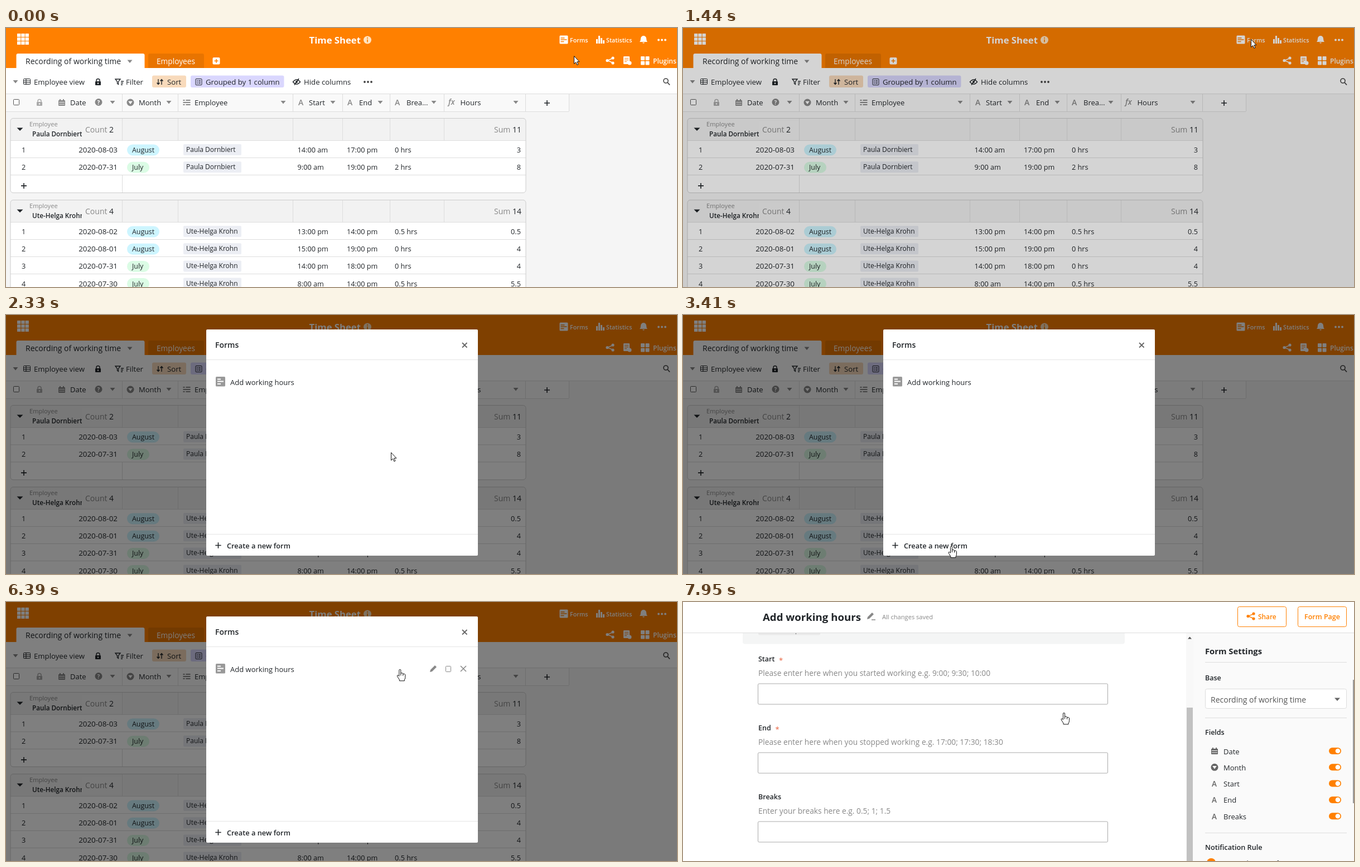
An HTML page that plays this animation: 1203 px wide and 466 px high, repeating every 8 s.

```html
<!DOCTYPE html>
<html lang="en">
<head>
<meta charset="utf-8">
<title>Time Sheet</title>
<style>
html, body { margin: 0; width: 100%; height: 100%; overflow: hidden; background: #fff; }
svg { display: block; width: 1203px; height: 466px; font-family: "Open Sans", "Noto Sans", sans-serif; }
</style>
</head>
<body>
<svg id="stage" viewBox="0 0 1203 466"></svg>
<script>
const ORANGE = '#ff8000', INK = '#212529', GRAY = '#888', LINE = '#ddd';
const stage = document.getElementById('stage');

// Drawing helpers, each returns SVG markup
const text = (x, y, s, size = 13, fill = INK, weight = 400, anchor = 'start') =>
  `<text x="${x}" y="${y}" font-size="${size}" fill="${fill}" font-weight="${weight}" text-anchor="${anchor}">${s}</text>`;
const rect = (x, y, w, h, fill, r = 0, stroke = 'none') =>
  `<rect x="${x}" y="${y}" width="${w}" height="${h}" rx="${r}" fill="${fill}" stroke="${stroke}"/>`;
const fillPath = (d, fill = GRAY) => `<path d="${d}" fill="${fill}"/>`;
const stroke = (d, color = INK, w = 1.5) => `<path d="${d}" fill="none" stroke="${color}" stroke-width="${w}"/>`;
const dot = (x, y, r, fill) => `<circle cx="${x}" cy="${y}" r="${r}" fill="${fill}"/>`;
const hline = (x1, x2, y, color = LINE) => stroke(`M${x1} ${y + .5}H${x2}`, color, 1);
const vlines = (xs, y1, y2, color = LINE) => xs.map(x => stroke(`M${x + .5} ${y1}V${y2}`, color, 1)).join('');
const group = (id, body) => `<g id="${id}">${body}</g>`;

// Icons
const caret = (x, y, fill = GRAY, w = 4.5) => fillPath(`M${x - w} ${y - 2.5}h${2 * w}l${-w} 5.5z`, fill);
const plus = (x, y, r = 5, color = INK, w = 1.6) => stroke(`M${x - r} ${y}h${2 * r}M${x} ${y - r}v${2 * r}`, color, w);
const dots = (x, y, fill) => [-6, 0, 6].map(d => dot(x + d, y, 1.9, fill)).join('');
const letterA = (x, y) => text(x, y, 'A', 14, GRAY, 600);
const lock = (x, y, color) => rect(x - 5, y - 1, 10, 7, color, 1) + stroke(`M${x - 3} ${y}v-2.5a3 3 0 0 1 6 0v2.5`, color) + dot(x, y + 2.5, 1.2, '#fff');
const calendar = (x, y, color = GRAY) => rect(x - 6, y - 4, 12, 10, color, 1) +
  stroke(`M${x - 3} ${y - 6}v3m6 -3v3`, color, 2) + stroke(`M${x - 5} ${y - .5}h10m-10 3.5h10`, '#fff', 1);
const dropCircle = (x, y, color = GRAY) => dot(x, y, 6.5, color) + caret(x, y + .3, '#fff', 3.8);
const share = (x, y, color) => stroke(`M${x + 5} ${y - 4}L${x - 5} ${y}L${x + 5} ${y + 4}`, color) +
  dot(x + 5, y - 4.5, 2.6, color) + dot(x - 5, y, 2.6, color) + dot(x + 5, y + 4.5, 2.6, color);
const formIcon = (x, y, color, back) => rect(x, y, 15, 15, color, 1.5) +
  stroke(`M${x + 2} ${y + 4.5}h7M${x + 2} ${y + 7.5}h11M${x + 2} ${y + 11}h6`, back, 1.5);
const pencil = (x, y, color = GRAY) => fillPath(`M${x - 6} ${y + 6}l1 -4l8 -8l3 3l-8 8z`, color);
const listIcon = (x, y, color) => stroke(`M${x} ${y - 4}h3m2 0h8M${x} ${y}h13M${x} ${y + 4}h3m2 0h8`, color, 1.8);
const tab = (x1, x2, fill) => fillPath(`M${x1} 72V49q0 -3 3 -3H${x2 - 3}q3 0 3 3V72z`, fill);

function topBar() {
  let s = rect(0, 0, 1203, 72, ORANGE);
  for (let i = 0; i < 9; i++) s += rect(20 + i % 3 * 7.3, 10 + Math.floor(i / 3) * 7, 6.3, 6, '#fff', .5);
  s += text(543.5, 28, 'Time Sheet', 16.7, '#fff', 700) + dot(648, 21.5, 7, '#ffe3c0') + stroke('M648 17v2m0 1.5v5', ORANGE, 1.8);
  s += formIcon(992.5, 13.5, '#fff', ORANGE) + text(1011, 25.5, 'Forms', 10.8, '#fff', 600);
  s += stroke('M1059.5 28v-8m4 8v-14m4 14v-10m4 10v-6', '#fff', 3) + text(1076, 25.5, 'Statistics', 10.7, '#fff', 600);
  s += fillPath('M1136 25q2 -2 2 -6a5 5 0 0 1 10 0q0 4 2 6zM1141 26h4q-2 3 -4 0z', '#fff') + dots(1176, 21.5, '#fff');
  s += tab(18.5, 248.5, '#fff') + text(35, 65, 'Recording of working time', 14) + caret(222, 60);
  s += tab(255, 355, '#e87400') + text(270, 65, 'Employees', 13.7, '#fff');
  s += rect(370.5, 53, 13, 12.5, '#fff', 2) + plus(377, 59.2, 3.5, ORANGE);
  s += share(1083, 58.5, '#fff') + rect(1107, 51, 11, 14, '#fff', 1) + stroke('M1109 54.5h7m-7 3h7m-7 3h4', ORANGE, 1) + dot(1118, 63, 3.5, '#fff');
  s += [[1138, 51], [1138, 59.5], [1146.5, 59.5], [1146.5, 51]].map(([x, y]) => rect(x, y, 7, 7, '#fff', 1)).join('');
  return s + text(1160, 64, 'Plugins', 12, '#fff', 600);
}

function toolBar() {
  const label = (x, s) => text(x, 101.5, s, 13.2);
  let s = rect(0, 72, 1203, 46, '#fff') + caret(17, 96.5);
  s += rect(31.5, 91.5, 12, 10, 'none', 1, INK) + stroke('M32 95h11m-11 3.3h11M36 92v9', INK, 1.1) + label(50, 'Employee view') + lock(165, 97, INK);
  s += stroke('M196 92h9l-3.5 4.5v5l-2 -1.5v-3.5zM206 96h5m-5 3h4m-4 3h3', INK, 1.3) + label(215, 'Filter');
  s += rect(262, 85.5, 61, 21.5, '#f8dabb', 3) + stroke('M273 92v9m-2.5 -2.5l2.5 3l2.5 -3M279 102v-9m-2.5 2.5l2.5 -3l2.5 3', INK, 1.4) + label(289, 'Sort');
  s += rect(331, 85.5, 167.5, 21.5, '#dad7fe', 3) + rect(340, 91.5, 11, 11, 'none', 1, INK) + stroke('M342 94.5h2m1 0h4m-7 2.5h2m1 0h4m-7 2.5h2m1 0h4', INK, 1.2) + label(358, 'Grouped by 1 column');
  s += stroke('M514.5 97q6.5 -8 13 0q-6.5 8 -13 0zM517 102.5l8 -11.5') + dot(521, 97, 2, INK) + label(534, 'Hide columns');
  return s + dots(649, 97, '#444') + '<circle cx="1183" cy="95" r="4" fill="none" stroke="#444" stroke-width="1.6"/>' + stroke('M1186 98l4 4.5', '#444', 1.8);
}

function columnHeads() {
  const label = (x, s) => text(x, 138.5, s);
  let s = rect(0, 118, 1009, 32, '#f9f9f9') + hline(0, 1203, 118) + hline(0, 1009, 150);
  s += vlines([208, 308, 514, 603, 688, 785, 931, 1009], 118, 150);
  s += rect(13.5, 128.5, 10, 10, '#fff', 1, '#555') + lock(60, 134, '#aaa');
  s += calendar(100, 134) + label(115, 'Date') + dot(166, 133.5, 6.5, GRAY) + text(166, 137.5, '?', 10, '#fff', 700, 'middle');
  s += dropCircle(223, 134) + label(238, 'Month') + listIcon(317.5, 134, GRAY) + label(338, 'Employee');
  s += letterA(524, 139) + label(543, 'Start') + letterA(612, 139) + label(633, 'End') + letterA(697, 139) + label(718, 'Brea...');
  s += `<g font-style="italic">${text(793, 138, 'fx', 13.5, GRAY, 600)}</g>` + label(814.5, 'Hours') + plus(970, 135);
  return s + [191, 292, 497, 586, 671, 767, 914].map(x => caret(x, 133.5)).join('');
}

function employeeGroup(top, height, name, sum, rows) {
  const body = top + 40, cols = [308, 514, 603, 688, 785];
  let s = rect(8, top, 924, height, '#fff', 5) + fillPath(`M8 ${body}V${top + 5}q0 -5 5 -5H927q5 0 5 5V${body}z`, '#f2f2f2');
  s += caret(25, top + 20, INK, 5.5) + text(42, top + 15, 'Employee', 11.1, GRAY) + text(47, top + 32.5, name, 11.7, INK, 600);
  s += rect(136, top + 6, 72, 32, '#f3f3f3') + text(142, top + 26, `Count <tspan fill="${INK}">${rows.length}</tspan>`, 14, GRAY);
  s += text(924, top + 26, `Sum <tspan fill="${INK}">${sum}</tspan>`, 14, GRAY, 400, 'end');
  s += vlines([208, ...cols], top, body) + hline(8, 932, body);
  rows.forEach(([date, start, end, pause, hours], i) => {
    const y = body + 31.2 * i, base = y + 22, august = date[1] === '8';
    const cell = (x, value, anchor) => text(x, base, value, 12.7, INK, 400, anchor);
    s += cell(28, i + 1) + text(200, base, '2020-' + date, 13.4, INK, 400, 'end');
    s += rect(217, y + 7.5, august ? 58 : 40, 20, august ? '#cdf5ff' : '#dbfce5', 10) + text(226, base, august ? 'August' : 'July', 12.4);
    s += rect(318, y + 7, 104, 20, '#eceef4', 2) + text(323, base - 1, name, 12);
    s += cell(522.5, start) + cell(611, end) + cell(697, pause + ' hrs') + cell(923, hours, 'end') + hline(8, 932, Math.round(y + 31));
  });
  const last = body + 31.2 * rows.length;
  s += vlines([208], last, top + height) + plus(32, last + 19.5);
  return s + rect(8, top + .5, 924, height - 1, 'none', 5, '#ccc');
}

function modal() {
  let s = rect(359, 26, 487, 407, '#fff', 2) + text(375, 58.5, 'Forms', 14, INK, 600);
  s += stroke('M818 50l8.5 8.5m0 -8.5l-8.5 8.5', '#666', 1.8) + hline(359, 846, 80, '#e5e5e5') + hline(359, 846, 394, '#e5e5e5');
  s += plus(380.5, 414.5, 5.2) + text(396, 420, 'Create a new form', 12.8, INK, 600);
  s += group('spinner', '<circle cx="602.5" cy="106" r="8.5" fill="none" stroke="#ccc" stroke-width="1.5"/>' + stroke('M602.5 97.5a8.5 8.5 0 0 1 8.5 8.5', '#555', 1.7));
  s += group('item', rect(376, 111, 17, 17.5, '#999', 1.5) + stroke('M379 115.5h6m-6 4h11m-11 4.5h6', '#fff', 2) + text(402, 125.5, 'Add working hours'));
  const tools = pencil(766, 120) + rect(788.5, 115.5, 9, 10, 'none', 1, GRAY) + stroke('M815 115l10 10m0 -10l-10 10', GRAY);
  return s + group('tools', tools);
}

function question(y, label, hint, required) {
  return text(135, y, label, 12.5, INK, 600) + (required ? text(required, y + 3, '*', 13, '#e8603c') : '') +
    text(135, y + 26.5, hint, 13.75, GRAY) + rect(134.5, y + 40.5, 627, 37, '#fff', 2, '#aaa');
}

function formPage() {
  let fields = text(135, 97.5, 'Date', 12.5, INK, 600) + rect(134.5, 112.5, 312, 36, '#fff', 2, '#aaa');
  fields += group('monthHover', rect(107, 157, 685, 83, '#f4f5f5', 4)) + text(135, 188.5, 'Month', 12.5, INK, 600);
  fields += rect(135, 203, 111, 21, '#e9e9e9', 2) + text(146, 219, 'Add an option', 13.2, '#777');
  fields += question(271, 'Start', 'Please enter here when you started working e.g. 9:00; 9:30; 10:00', 172);
  fields += question(395, 'End', 'Please enter here when you stopped working e.g. 17:00; 17:30; 18:30', 165.5);
  fields += question(519, 'Breaks', 'Enter your breaks here e.g. 0.5; 1; 1.5');
  let s = group('fields', fields) + rect(902, 56, 13, 410, '#f8f8f8');
  s += group('thumb', rect(903, 71, 11, 376, '#c1c1c1')) + '<path id="scrollUp" d="M905 66.5h7l-3.5 -4z"/>';
  s += rect(915, 56, 288, 410, '#fafafa') + rect(1201, 140, 2, 222, '#999');
  s += rect(0, 0, 1203, 55, '#fff') + hline(0, 1203, 55) + text(143, 34, 'Add working hours', 18.65, INK, 700);
  s += pencil(336, 25) + stroke('M338 32h7', GRAY) + text(357, 30.5, 'All changes saved', 11.1, GRAY);
  s += rect(994.5, 8.5, 87, 36, '#fff', 3, ORANGE) + share(1018, 25.5, ORANGE) + text(1031, 30.5, 'Share', 11.9, ORANGE, 600);
  s += rect(1102.5, 8.5, 87, 36, '#fff', 3, ORANGE) + text(1114, 30.5, 'Form Page', 12.5, ORANGE, 600);
  s += text(936, 93.5, 'Form Settings', 14.8, INK, 700) + text(936, 141, 'Base', 12.5, INK, 600);
  s += rect(936.5, 156.5, 253, 35, '#fff', 3, '#ddd') + text(946, 180.5, 'Recording of working time', 14, '#555') + caret(1173, 175, '#666', 5);
  s += [108, 208, 415].map(y => hline(936, 1190, y)).join('') + text(936, 239, 'Fields', 12.5, INK, 600);
  ['Date', 'Month', 'Start', 'End', 'Breaks'].forEach((name, i) => {
    const y = 268 + 29.3 * i;
    s += i === 0 ? calendar(953, y, '#666') : i === 1 ? dropCircle(953, y, '#666') : text(948, y + 5.5, 'A', 13.5, '#666', 600);
    s += text(969, y + 5.5, name) + rect(1158, y - 6, 22, 12, ORANGE, 6) + dot(1174, y, 4.3, '#fff');
  });
  s += text(936, 446, 'Notification Rule', 12.7, INK, 600) + dot(947, 469, 8, ORANGE);
  return rect(0, 0, 1203, 466, '#fff') + group('form', s + text(963, 475, 'Form submit notification', 12.5));
}

stage.innerHTML = rect(0, 0, 1203, 466, '#f5f5f5') + topBar() + toolBar() + columnHeads() +
  employeeGroup(162, 135, 'Paula Dornbiert', 11, [
    ['08-03', '14:00 am', '17:00 pm', 0, 3], ['07-31', '9:00 am', '19:00 pm', 2, 8]]) +
  employeeGroup(309, 200, 'Ute-Helga Krohn', 14, [
    ['08-02', '13:00 pm', '14:00 pm', 0.5, 0.5], ['08-01', '15:00 pm', '19:00 pm', 0, 4],
    ['07-31', '14:00 pm', '18:00 pm', 0, 4], ['07-30', '8:00 am', '14:00 pm', 0.5, 5.5]]) +
  group('backdrop', rect(0, 0, 1203, 466, '#000')) + group('modal', modal()) + group('page', formPage()) +
  group('cursor', '<path fill="#fff" stroke="#111" stroke-linejoin="round"/>');

const part = Object.fromEntries([...stage.querySelectorAll('[id]')].map(el => [el.id, el]));
const pointer = part.cursor.firstChild;
const ARROW = 'M.5 .5V14.5L3.7 11.5L5.9 16.5L8 15.5L5.9 10.7H10z';
const HAND = 'M-1.5 12V1.5Q-1.5 0 0 0T1.5 1.5V6.5Q5.2 5.8 5.5 8Q9.2 7.5 9.5 9.5V14Q9.5 17 8 18.5V20.5H-1V18.5L-4.8 12.5Q-5.5 10 -3.5 10.4zM1.5 6.5v4.5M5.5 8v3.5';

// Motion comes in discrete steps: n of them, the first at time a, the last at time b
const clamp = v => Math.max(0, Math.min(1, v));
const stepped = (t, a, b, n) => clamp((Math.floor((t - a) / ((b - a) / (n - 1) || 1) + .001) + 1) / n);

// first step, last step, steps, x, y
const moves = [
  [120, 780, 7, 1012, 10], [920, 920, 1, 1018, 20], [1990, 2210, 3, 720, 118],
  [2330, 2330, 1, 690, 247], [2660, 3410, 8, 481, 416], [4310, 4630, 4, 618, 276],
  [4960, 5630, 7, 408, 118], [5940, 6490, 6, 766, 122], [6830, 7060, 3, 683, 199.5]];

const display = (el, on) => el.setAttribute('display', on ? 'inline' : 'none');
const shift = (el, x, y) => el.setAttribute('transform', `translate(${x} ${y})`);

function draw(t) {
  let x = 1018, y = 50;
  for (const [a, b, n, toX, toY] of moves) {
    const p = stepped(t, a, b, n);
    x += (toX - x) * p;
    y += (toY - y) * p;
  }
  const onItem = t >= 2100 && t < 6720 && y > 104 && y < 140 && x < 830;
  const onCreate = t > 2330 && y > 394;
  const onForms = t >= 780 && t < 1220;
  shift(part.cursor, x, y);
  pointer.setAttribute('d', onItem || onCreate || onForms || t >= 7060 ? HAND : ARROW);

  const opening = 1440 + 110 * Math.floor((t - 1440) / 110);
  part.backdrop.setAttribute('opacity', .5 * clamp((opening - 1390) / 150));
  part.modal.setAttribute('opacity', clamp((opening - 1550) / 140));
  shift(part.modal, 0, -102 * (1 - clamp((opening - 1550) / 300)) ** 1.8);
  const loaded = opening >= 1990;
  part.spinner.setAttribute('transform', `rotate(${(opening - 1660) * .5} 602.5 106)`);
  display(part.spinner, !loaded);
  display(part.item, loaded);
  display(part.tools, onItem);

  display(part.page, t >= 6720);
  display(part.form, t >= 6830);
  display(part.monthHover, t >= 7060);
  const scroll = stepped(t, 7490, 7950, 5);
  shift(part.fields, 0, -164.5 * scroll);
  shift(part.thumb, 0, 119 * scroll);
  part.scrollUp.setAttribute('fill', scroll ? '#505050' : '#a3a3a3');
}

function tick() {
  draw(performance.now() % 8000);
  requestAnimationFrame(tick);
}
tick();
</script>
</body>
</html>
```
